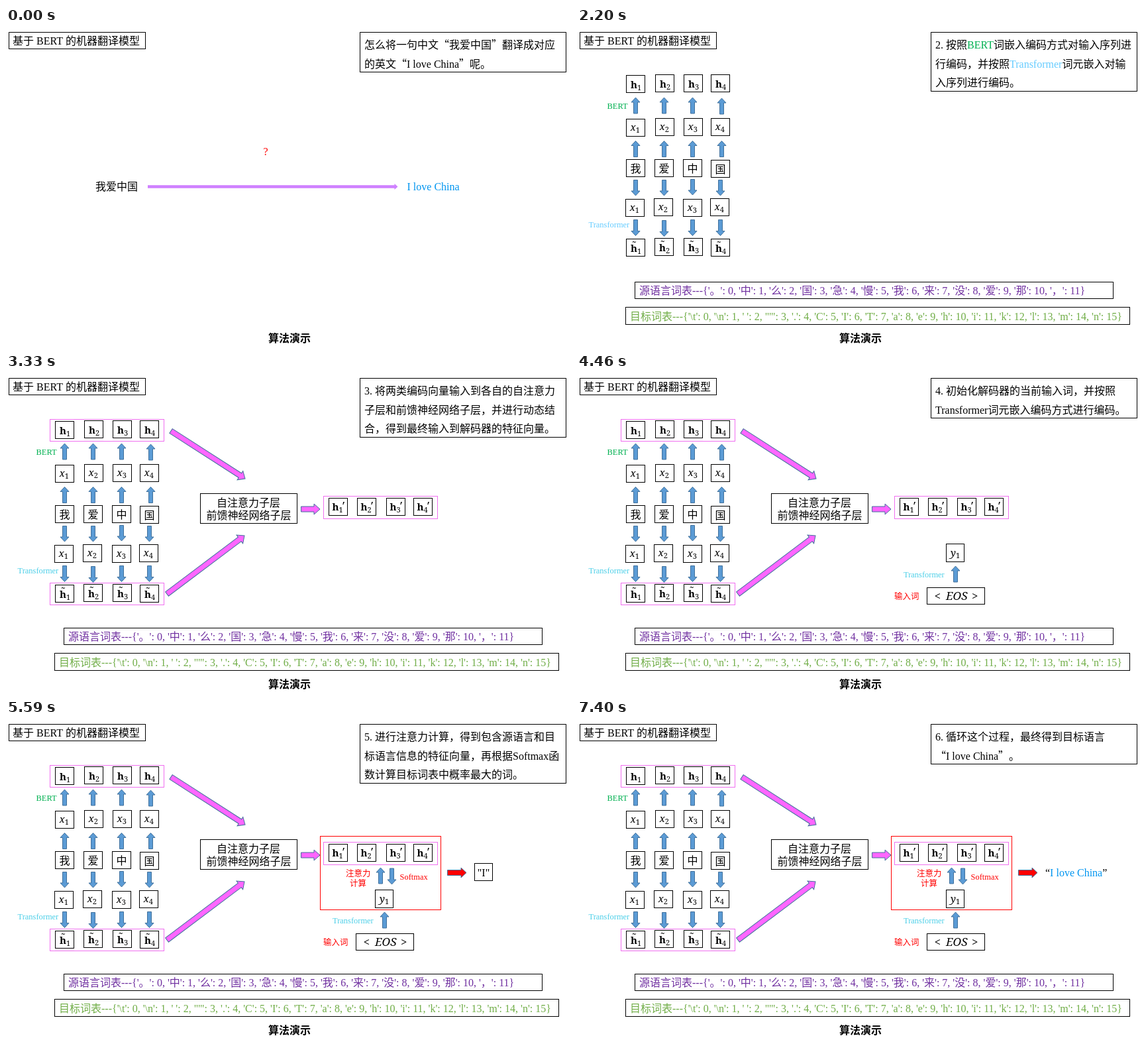
An HTML page with a canvas that plays this animation: 853x480 px, repeating every 7850 ms.

```html
<!DOCTYPE html>
<html lang="zh-CN">
<head>
<meta charset="utf-8">
<style>
html, body { margin: 0; width: 853px; height: 480px; overflow: hidden; background: #fff; }
canvas { display: block; }
</style>
</head>
<body>
<canvas id="stage" width="853" height="480"></canvas>
<script>
const ctx = document.getElementById('stage').getContext('2d');
const LATIN = '"Liberation Serif", serif';
const HAN = '"Noto Sans CJK SC", "Noto Sans CJK", sans-serif';
const MATH = '"Noto Serif", serif';
const BLACK = '#000', RED = '#f00', PINK = '#ff66ff', FRAME = '#f070f0', LILAC = '#cf80ff';
const BLUE = '#5b9bd5', SKY = '#0095f0', GREEN = '#00b050', CYAN = '#66ccff', TEAL = '#4dcfe8';
const SMALL = 12.44;

const FIRST = 1070, STEP = 1130, LOOP = FIRST + 6 * STEP;

function plain(str, x, y, color, font) {
  ctx.font = font;
  ctx.fillStyle = color;
  ctx.fillText(str, x, y);
  return x + ctx.measureText(str).width;
}

// Mixed text: Chinese characters and punctuation use the Han font.
function text(str, x, y, color = BLACK, size = 16, weight = '') {
  for (const part of str.split(/([“”\u3000-\u9fff\uff00-\uffef]+)/)) {
    const han = /[“”\u3000-\uffef]/.test(part);
    x = plain(part, x, y, color, han ? `${weight || 300} ${size}px ${HAN}` : `${weight} ${size}px ${LATIN}`);
  }
  return x;
}

function box(x1, y1, x2, y2, color = BLACK) {
  ctx.strokeStyle = color;
  ctx.lineWidth = 1;
  ctx.strokeRect(x1 + 0.5, y1 + 0.5, x2 - x1 - 1, y2 - y1 - 1);
}

function arrow(x1, y1, x2, y2, fill = BLUE, shaft = 6, head = 13, tip = 7, outline = '#41719c') {
  const length = Math.hypot(x2 - x1, y2 - y1), neck = length - tip;
  const s = shaft / 2, h = head / 2;
  ctx.save();
  ctx.translate(x1, y1);
  ctx.rotate(Math.atan2(y2 - y1, x2 - x1));
  ctx.beginPath();
  for (const [x, y] of [[0, -s], [neck, -s], [neck, -h], [length, 0], [neck, h], [neck, s], [0, s]]) ctx.lineTo(x, y);
  ctx.closePath();
  ctx.fillStyle = fill;
  ctx.fill();
  ctx.strokeStyle = outline;
  ctx.lineWidth = 1;
  if (outline !== fill) ctx.stroke();
  ctx.restore();
}

function symbol(letter, index, x, y, style) {
  const end = plain(letter, x, y, BLACK, `${style} 15px ${MATH}`);
  plain(index, end, y + 3, BLACK, `11px ${MATH}`);
  return end;
}

const labels = {
  word: (i, x, y) => text('我爱中国'[i], x + 6.5, y + 20),
  x: (i, x, y) => symbol('x', i + 1, x + 6.5, y + 18, 'italic'),
  h: (i, x, y) => symbol('h', i + 1, x + 7, y + 20, 'bold'),
  tilde(i, x, y) {
    symbol('h', i + 1, x + 7, y + 20, 'bold');
    plain('˜', x + 9, y + 15, BLACK, `15px ${MATH}`);
  },
  prime(i, x, y) {
    const end = symbol('h', i + 1, x + 5.5, y + 19, 'bold');
    plain('′', end + 5.5, y + 18.5, BLACK, `18px ${MATH}`);
  }
};

function cells(kind, xs, ys) {
  xs.forEach((x, i) => {
    box(x, ys[i], x + 29, ys[i] + 27);
    labels[kind](i, x, ys[i]);
  });
}

function arrows(from, to, shifts = [0, 0, 0, 0]) {
  [88.5, 131.5, 174.5, 216.5].forEach((x, i) => {
    const up = to < from && i === 3 ? 2 : 0;
    arrow(x + up, from + shifts[i], x + up, to + shifts[i]);
  });
}

function pinkArrow(x1, y1, x2, y2) {
  arrow(x1, y1, x2, y2, PINK, 8, 16, 9);
}

// Each line is a list of text and colour pairs.
const notes = [
  [['怎么将一句中文“我爱中国”翻译成对应'], ['的英文“I love China”呢。']],
  [['1. 利用', BLACK, '源语言词表', LILAC, '将“我爱中国”转化为'], ['输入序列。']],
  [['2. 按照', BLACK, 'BERT', GREEN, '词嵌入编码方式对输入序列进'],
   ['行编码，并按照', BLACK, 'Transformer', CYAN, '词元嵌入对输'], ['入序列进行编码。']],
  [['3. 将两类编码向量输入到各自的自注意力'], ['子层和前馈神经网络子层，并进行动态结'], ['合，得到最终输入到解码器的特征向量。']],
  [['4. 初始化解码器的当前输入词，并按照'], ['Transformer词元嵌入编码方式进行编码。']],
  [['5. 进行注意力计算，得到包含源语言和目'], ['标语言信息的特征向量，再根据Softmax函'], ['数计算目标词表中概率最大的词。']],
  [['6. 循环这个过程，最终得到目标语言'], ['“I love China”。']]
];

function note(scene) {
  box(534, 6, 846, notes[scene].length === 3 ? 96 : 67);
  notes[scene].forEach((line, row) => {
    let x = 541;
    for (let i = 0; i < line.length; i += 2) x = text(line[i], x, 31 + Math.round(row * 28.5), line[i + 1]);
  });
}

function vocabulary() {
  const list = keys => keys.map((key, i) => `${key === "'" ? `"'"` : `'${key}'`}: ${i}`).join(', ');
  box(87, 383, 810, 409);
  text(`源语言词表---{${list([...'。中么国急慢我来没爱那，'])}}`, 94, 402, '#7030a0');
  box(73, 421, 835, 448);
  text(`目标词表---{${list(['\\t', '\\n', ...' \'.CITaehiklmn'])}}`, 80, 441, '#70ad47');
}

function question() {
  text('?', 388.5, 192, RED);
  text('我爱中国', 135, 245);
  arrow(214, 239.5, 591.5, 239.5, LILAC, 4.5, 9, 5, LILAC);
  text('I love China', 605.5, 244.5, SKY);
}

function inputs() {
  cells('word', [74, 117, 160, 202], [198, 198, 198, 199]);
  arrows(229.5, 253, [0, 0, -1, 0]);
  cells('x', [73, 116, 160, 201], [258, 257, 258, 257]);
}

function encodings(scene) {
  cells('h', [74, 118, 161, 202], [71, 70, 70, 70]);
  arrows(129, 105, [0, 0, 0, 1]);
  cells('x', [74, 118, 161, 202], [137, 136, 136, 136]);
  arrows(194.5, 170.5);
  arrows(289.5, 313.5, [0, 1, 0, 0]);
  cells('tilde', [74, 117, 161, 202], [318, 317, 317, 318]);
  text('BERT', 45.5, 122, GREEN, SMALL);
  text('Transformer', 17.5, 301, scene === 2 ? CYAN : TEAL, SMALL);
}

function fusion() {
  box(66, 68, 239, 102, FRAME);
  box(66, 315, 239, 349, FRAME);
  pinkArrow(249, 86, 361, 158);
  pinkArrow(243, 332, 360, 244);
  box(293, 180, 440, 226);
  text('自注意力子层', 318, 200);
  text('前馈神经网络子层', 302.5, 219);
  pinkArrow(445.5, 204, 474, 204);
  box(479, 184, 652, 219, FRAME);
  cells('prime', [487, 530, 574, 615], [187, 187, 187, 187]);
}

function decoder() {
  box(557, 256, 585, 284);
  symbol('y', 1, 564, 275, 'italic');
  arrow(571.5, 314, 571.5, 290);
  text('Transformer', 493, 307, TEAL, SMALL);
  text('输入词', 479, 340, RED, SMALL);
  box(528, 322, 616, 348);
  plain('<', 539.5, 341, BLACK, `17px ${MATH}`);
  plain('EOS', 557, 341, BLACK, `italic 17px ${MATH}`);
  plain('>', 596, 341, BLACK, `17px ${MATH}`);
}

function attention() {
  box(474, 175, 657, 287, RED);
  arrow(565.5, 247, 565.5, 223);
  arrow(582.5, 224, 582.5, 248);
  text('注意力', 513, 236, RED, SMALL);
  text('计算', 519, 251, RED, SMALL);
  text('Softmax', 594.5, 241, RED, SMALL);
  arrow(666.5, 230.5, 695, 230.5, RED, 8, 15, 8);
}

function result(scene) {
  if (scene === 5) {
    box(707, 216, 735, 243);
    text('"I"', 711.8, 236);
    return;
  }
  const font = `16px ${LATIN}`;
  let x = plain('“', 707, 236, BLACK, font);
  x = plain('I love China', x, 236, SKY, font);
  plain('”', x, 236, BLACK, font);
}

function draw(scene) {
  ctx.fillStyle = '#fff';
  ctx.fillRect(0, 0, 853, 480);
  box(4, 6, 211, 32);
  text('基于 BERT 的机器翻译模型', 10, 25);
  text('算法演示', 396, 474, BLACK, 16, 'bold');
  note(scene);
  if (scene === 0) return question();
  vocabulary();
  inputs();
  if (scene === 1) ['6', '9', '1', '3'].forEach((id, i) => text(id, [80, 123.5, 169, 210][i], 307, RED));
  if (scene >= 2) encodings(scene);
  if (scene >= 3) fusion();
  if (scene >= 4) decoder();
  if (scene >= 5) {
    attention();
    result(scene);
  }
}

function tick() {
  const time = performance.now() % LOOP;
  draw(time < FIRST ? 0 : 1 + Math.floor((time - FIRST) / STEP));
  requestAnimationFrame(tick);
}
tick();
</script>
</body>
</html>
```
